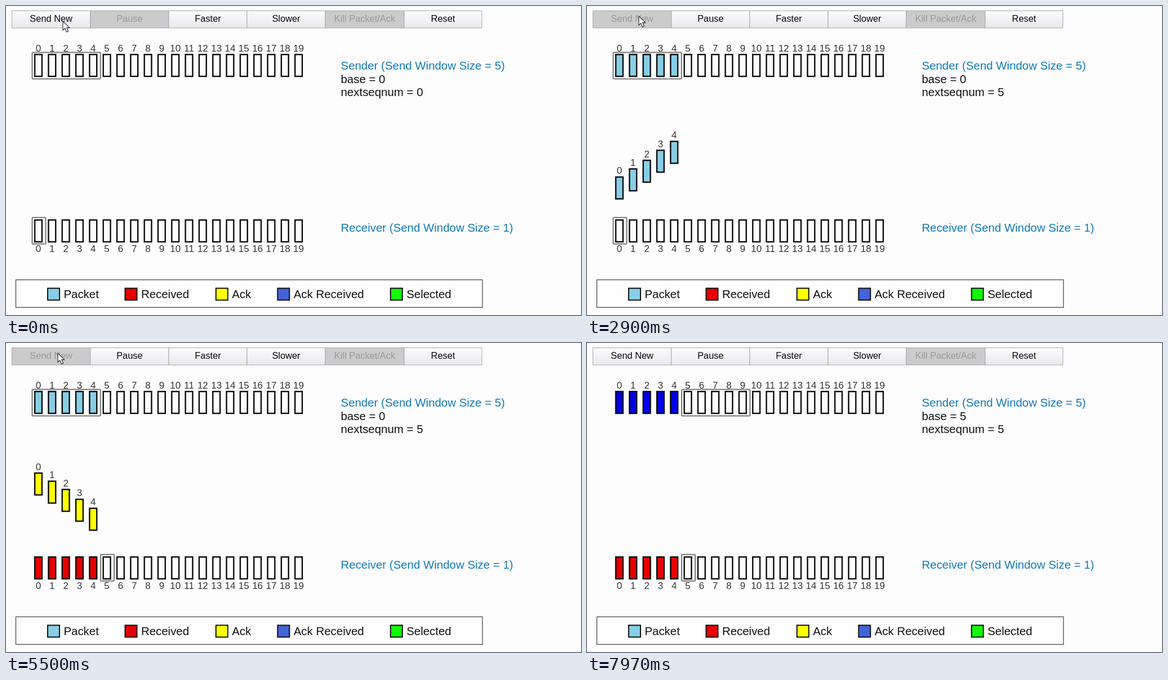
Animation, 1021 px wide and 549 px high, one loop 8010 ms. Source, as an HTML page:

```html
<!DOCTYPE html>
<html lang="en">
<head>
<meta charset="utf-8">
<title>Go-Back-N</title>
<style>
  html, body { margin: 0; width: 100%; height: 100%; overflow: hidden; background: #fdfdfd; }
  svg { display: block; width: 1021px; height: 549px; font-family: "Liberation Sans", Arial, sans-serif; }
  .digit { font-size: 17px; fill: #333; text-anchor: middle; }
  .label { font-size: 16.4px; text-anchor: middle; }
  .info { font-size: 20.45px; fill: #111; }
  .title { fill: #1279b9; }
  .cell { stroke: #0a0a0a; stroke-width: 2.4; }
  .window { fill: none; stroke: #777; stroke-width: 2; }
</style>
</head>
<body>
<svg id="stage" viewBox="0 0 1021 549">
  <defs>
    <linearGradient id="face" x2="0" y2="1">
      <stop offset="0" stop-color="#fcfcfd"/>
      <stop offset="1" stop-color="#e9e9ed"/>
    </linearGradient>
  </defs>
</svg>
<script>
const LOOP = 8010, PITCH = 24.32, SENDER_Y = 86.2, RECEIVER_Y = 380.2;
const DOWN = 0.0872, UP = 0.0887;
const SENT = [405, 570, 745, 950, 1130];
const ACKED = [3820, 3983, 4148, 4346, 4526];
const TRIP = RECEIVER_Y - SENDER_Y;
const COLOR = { packet: '#87cee6', received: '#e60000', ack: '#ffff00', done: '#0000eb', empty: '#fdfdfd' };

const stage = document.getElementById('stage');

function set(node, attrs) {
  for (const key in attrs) node.setAttribute(key, attrs[key]);
  return node;
}
function add(tag, attrs, parent = stage) {
  return parent.appendChild(set(document.createElementNS('http://www.w3.org/2000/svg', tag), attrs));
}
function write(text, x, y, cls) {
  const node = add('text', { x, y, class: cls });
  node.textContent = text;
  return node;
}
const show = (node, on) => set(node, { visibility: on ? 'visible' : 'hidden' });
const countUntil = (times, t, delay = 0) => times.filter(time => t >= time + delay).length;
const slotX = i => 57.5 + i * PITCH;

// Toolbar
const edges = [10.5, 149.8, 289, 428, 567, 707, 845];
const buttons = ['Send New', 'Pause', 'Faster', 'Slower', 'Kill Packet/Ack', 'Reset'].map((name, i) => {
  const x = edges[i], width = edges[i + 1] - x;
  const box = add('rect', { x, y: 8.5, width, height: 30.5, stroke: '#a8a8ae' });
  return { box, text: write(name, x + width / 2, 28.2, 'label') };
});
function enable({ box, text }, on) {
  set(box, { fill: on ? 'url(#face)' : '#cbcbcb' });
  set(text, { fill: on ? '#080808' : '#999' });
}
buttons.forEach(b => enable(b, true));
enable(buttons[4], false);
const focus = add('rect', {
  x: 11.3, y: 9.5, width: 137.5, height: 28.5, fill: 'none',
  stroke: '#111', 'stroke-width': 3, 'stroke-dasharray': '3 2.5'
});

// Slot rows
function cell(i, y, fill) {
  return add('rect', { x: slotX(i) - 6.4, y, width: 12.8, height: 38.8, fill, class: 'cell' });
}
function row(y, labelY) {
  return Array.from({ length: 20 }, (_, i) => {
    write(i, slotX(i), labelY, 'digit');
    return cell(i, y, COLOR.empty);
  });
}
function slotWindow(y, size) {
  return add('rect', { x: 46.5, y, width: size * PITCH - 0.3, height: 47, rx: 1.5, class: 'window' });
}
const sender = row(SENDER_Y, 81);
const receiver = row(RECEIVER_Y, 437);
const sendWindow = slotWindow(82.5, 5);
const receiveWindow = slotWindow(375.8, 1);

const movers = SENT.map((_, i) => {
  const group = add('g', {});
  group.append(cell(i, 0, COLOR.packet), write(i, slotX(i), -5.4, 'digit'));
  return group;
});

// Status text
write('Sender (Send Window Size = 5)', 594.5, 113, 'info title');
const baseText = write('', 594.5, 137, 'info');
const nextText = write('', 594.5, 160.3, 'info');
write('Receiver (Send Window Size = 1)', 594.5, 401, 'info title');

// Legend
add('rect', { x: 17.5, y: 486.5, width: 828.5, height: 49, fill: '#fefefe', stroke: '#3a3a44', 'stroke-width': 1.2 });
[
  ['Packet', 74, COLOR.packet], ['Received', 211.5, COLOR.received], ['Ack', 372.8, COLOR.ack],
  ['Ack Received', 482.3, '#4363d8'], ['Selected', 682.8, '#12fa05']
].forEach(([name, x, fill]) => {
  add('rect', { x, y: 501.5, width: 21, height: 21, fill, stroke: '#111', 'stroke-width': 2 });
  write(name, x + 28.4, 518.5, 'info');
});

const cursor = add('path', {
  d: 'M0 0V16L3.8 12.6L6.6 19.2L9.6 18L6.8 11.6H11.8Z', fill: '#fff', stroke: '#222', 'stroke-width': 1.1
});
const cursorPath = [[0, 101, 27], [80, 101, 27], [330, 92, 18], [6280, 92, 18], [6600, 112, -24], [LOOP, 112, -24]];
function cursorAt(t) {
  const k = cursorPath.findIndex(point => point[0] > t);
  const [t0, x0, y0] = cursorPath[k - 1], [t1, x1, y1] = cursorPath[k];
  const p = (t - t0) / (t1 - t0), e = p * p * (3 - 2 * p);
  return `translate(${x0 + (x1 - x0) * e} ${y0 + (y1 - y0) * e})`;
}

function draw(t) {
  const next = countUntil(SENT, t);
  const received = countUntil(ACKED, t);
  const base = countUntil(ACKED, t, TRIP / UP);

  enable(buttons[0], next < base + 5);
  enable(buttons[1], next > 0);
  show(focus, next > 0 && next < 5);
  baseText.textContent = `base = ${base}`;
  nextText.textContent = `nextseqnum = ${next}`;
  set(sendWindow, { transform: `translate(${base * PITCH} 0)` });
  set(receiveWindow, { transform: `translate(${received * PITCH} 0)` });
  set(cursor, { transform: cursorAt(t) });

  movers.forEach((mover, i) => {
    const acking = i < received;
    const y = acking
      ? RECEIVER_Y - (t - ACKED[i]) * UP
      : Math.min(RECEIVER_Y, SENDER_Y + (t - SENT[i]) * DOWN);
    show(mover, i < next && i >= base);
    set(mover, { transform: `translate(0 ${y})` });
    set(mover.firstChild, { fill: acking ? COLOR.ack : COLOR.packet });
    set(sender[i], { fill: i < base ? COLOR.done : i < next ? COLOR.packet : COLOR.empty });
    set(receiver[i], { fill: acking ? COLOR.received : COLOR.empty });
  });
}

const start = performance.now();
function tick() {
  draw((performance.now() - start) % LOOP);
  requestAnimationFrame(tick);
}
tick();
</script>
</body>
</html>
```
